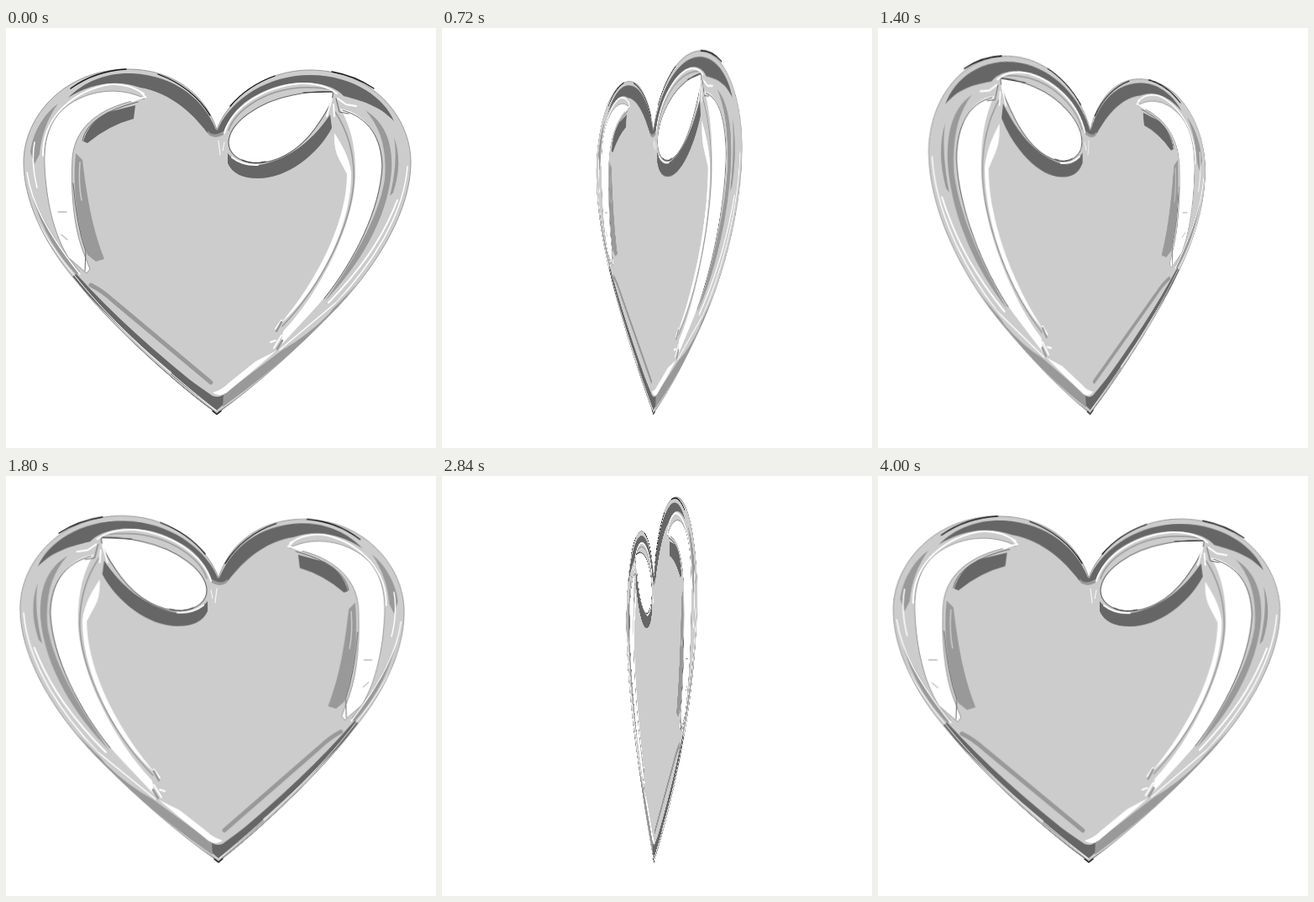
Recreate the animation shown at these times as an HTML page. Size 512 by 500 pixels, loop 4040 ms.

```html
<!DOCTYPE html>
<html lang="en">
<head>
<meta charset="utf-8">
<title>Spinning heart</title>
<style>
  html, body { margin: 0; width: 100%; height: 100%; overflow: hidden; background: #fff; }
  #stage {
    position: relative; width: 512px; height: 500px; overflow: hidden;
    perspective: 1000px; perspective-origin: 252px 225px;
  }
  #heart { position: absolute; left: 0; top: 0; transform-origin: 252px 225px; }
  .white { fill: #fff } .mid { fill: #999 } .dark { fill: #666 } .pale { fill: #ccc }
  .line { fill: none; stroke-linecap: round }
</style>
</head>
<body>
<div id="stage">
<svg id="heart" width="512" height="500" viewBox="0 0 512 500">
  <defs>
    <path id="outline" d="M251 121C263 87 305 50 362 50C435 50 482 105 482 160C482 215 445 279 395 332C350 379 295 428 251 459C205 426 125 354 85 303C45 257 21 205 21 160C21 105 70 49 145 49C200 49 238 80 251 121Z"/>
    <clipPath id="inside"><use href="#outline"/></clipPath>
  </defs>
  <use href="#outline" class="pale"/>
  <g clip-path="url(#inside)">
    <!-- dark upper rim -->
    <path class="dark" d="M74 83C94 63 120 53 150 54C203 57 236 86 250 121L260 122Q257 130 249 129Q241 128 236 120C216 95 190 76 160 71C130 60 98 67 74 83Z"/>
    <path class="dark" d="M252 121C266 88 308 56 362 56C415 56 452 85 462 111C447 95 430 88 402 81C390 66 350 58 313 73C283 85 268 101 259 124Z"/>
    <path class="mid" d="M240 122Q247 131 260 122L259 127Q249 133 241 127Z"/>

    <!-- side rims -->
    <path class="mid" d="M29 148C32 122 47 101 62 90C49 108 42 128 40 150L34 162Z"/>
    <path class="mid" d="M30 194Q48 243 88 290L84 294Q44 252 30 194Z"/>
    <path class="mid" d="M428 98C452 113 461 138 459 170C455 222 425 278 380 325C412 279 444 226 451 180C454 145 446 118 428 98Z"/>
    <path class="mid" d="M462 130Q473 160 461 196L457 200Q467 160 462 130Z"/>
    <g class="line" stroke="#fff">
      <path stroke-width="1.500" d="M25 172C30 207 49 244 88 293M34 136C31 152 32 170 37 190"/>
      <path stroke-width="2" d="M44 152C43 110 75 78 118 68Q142 64 164 78"/>
      <path stroke-width="1.500" d="M478 165C474 218 441 275 394 326L326 383"/>
      <path stroke-width="2" d="M466 205C448 252 420 290 384 327"/>
    </g>

    <!-- lower rim -->
    <path class="line" stroke="#666" stroke-width="7" d="M83 297C126 345 184 396 240 440"/>
    <path class="dark" d="M200 406L246 438Q255 441 261 435L259 448L251 455Q224 436 196 412Z"/>
    <path class="mid" d="M259 436L328 384Q380 348 418 304Q366 373 258 451Z"/>
    <path class="pale" d="M330 383Q379 346 408 310L384 341Q360 365 330 383Z"/>
    <path class="white" d="M246 434Q257 431 266 422L297 397L322 384L300 403L263 434Q254 440 246 434Z"/>
    <g class="line">
      <path stroke="#999" stroke-width="5" d="M101 306Q115 313 128 325L244 422"/>
      <path stroke="#fff" d="M30 214Q48 256 86 300C125 349 190 408 250 455"/>
      <path stroke="#333" stroke-width="1.500" d="M84 303C125 355 205 426 251 459L282 437"/>
    </g>
  </g>

  <!-- left reflection -->
  <path class="white" stroke="#999" d="M165 84C133 68 95 75 71 94C49 112 45 139 46 164C48 205 56 243 74 273L96 292L100 287L91 264C80 235 77 190 79 155C82 115 116 92 165 84Z"/>
  <path class="dark" d="M92 135Q98 112 122 100L154 92L152 108Q122 116 97 137Z"/>
  <path class="mid" d="M83 149L91 157C96 198 102 237 117 275L107 278L97 270C84 232 79 190 83 149Z"/>
  <g class="line">
    <path stroke="#666" d="M80 185Q84 235 95 266L94 289M91 134Q97 103 157 88"/>
    <path stroke="#999" d="M62 219H72M66 246L73 252"/>
    <path stroke="#ccc" stroke-width="1.500" d="M88 160Q86 185 90 205"/>
    <path stroke="#fff" stroke-width="2" d="M150 87L166 82L160 76"/>
  </g>

  <!-- oval reflection -->
  <path class="dark" d="M264 149Q276 165 301 163C339 157 368 130 386 103L388 119C371 151 335 179 300 179Q272 179 264 161Z"/>
  <path class="white" stroke="#666" stroke-width="1.200" d="M265 136C266 113 300 88 341 80Q370 74 389 76C391 84 380 103 367 121C346 149 320 161 296 161C276 159 265 149 265 136Z"/>
  <g class="line">
    <path stroke="#999" stroke-width="1.500" d="M265 122C273 98 308 74 350 71Q374 70 388 74"/>
    <path stroke="#fff" stroke-width="2" d="M260 125C269 95 306 70 350 66Q377 65 394 78M269 154Q282 164 300 163M388 84L382 105"/>
    <path stroke="#fff" d="M253 134L255 151M260 136L258 146"/>
    <path stroke="#333" d="M281 157Q294 163 309 159M354 77L388 76"/>
  </g>

  <!-- right reflection -->
  <path class="white" d="M398 96C431 102 447 132 447 166C445 218 411 288 365 337L327 378L330 361C374 315 414 234 416 178C417 145 411 117 398 96Z"/>
  <path class="white" d="M391 125C398 136 409 153 411 172C412 231 376 309 327 352L321 359C370 303 406 231 406 174L397 157Q390 145 391 125Z"/>
  <g class="line">
    <path stroke="#999" stroke-width="1.500" d="M392 100C409 126 415 153 414 182C411 235 376 306 329 355"/>
    <path stroke="#666" d="M401 98C433 107 447 132 448 164C446 216 414 278 379 322M393 84L397 100L408 102"/>
    <path stroke="#fff" stroke-width="2" d="M395 84L405 91L417 93M390 91L391 105M328 348L321 358M328 366L319 381M321 372L315 374"/>
    <path stroke="#999" stroke-width="2.500" d="M328 350L322 361M329 372L323 382"/>
  </g>

  <!-- contour -->
  <use href="#outline" class="line" stroke="#999"/>
  <g class="line" stroke="#111" stroke-width="1.300">
    <path d="M77 72Q106 51 143 49M181 55Q222 70 243 104M267 93Q287 69 320 57M388 52Q416 57 438 72M246 456L251 460L256 456"/>
  </g>
</svg>
</div>
<script>
  const STEP = 40, FRONT = 47, BACK = 54;
  const heart = document.getElementById('heart');

  // The first half turn is a little quicker than the second.
  function angleAt(ms) {
    const step = Math.floor(ms / STEP) % (FRONT + BACK);
    return step < FRONT ? step * 180 / FRONT : 180 + (step - FRONT) * 180 / BACK;
  }

  function draw(ms) {
    heart.style.transform = `rotateY(${-angleAt(ms)}deg)`;
  }

  const start = performance.now();
  function tick() {
    draw(performance.now() - start);
    requestAnimationFrame(tick);
  }
  draw(0);
  requestAnimationFrame(tick);
</script>
</body>
</html>
```
